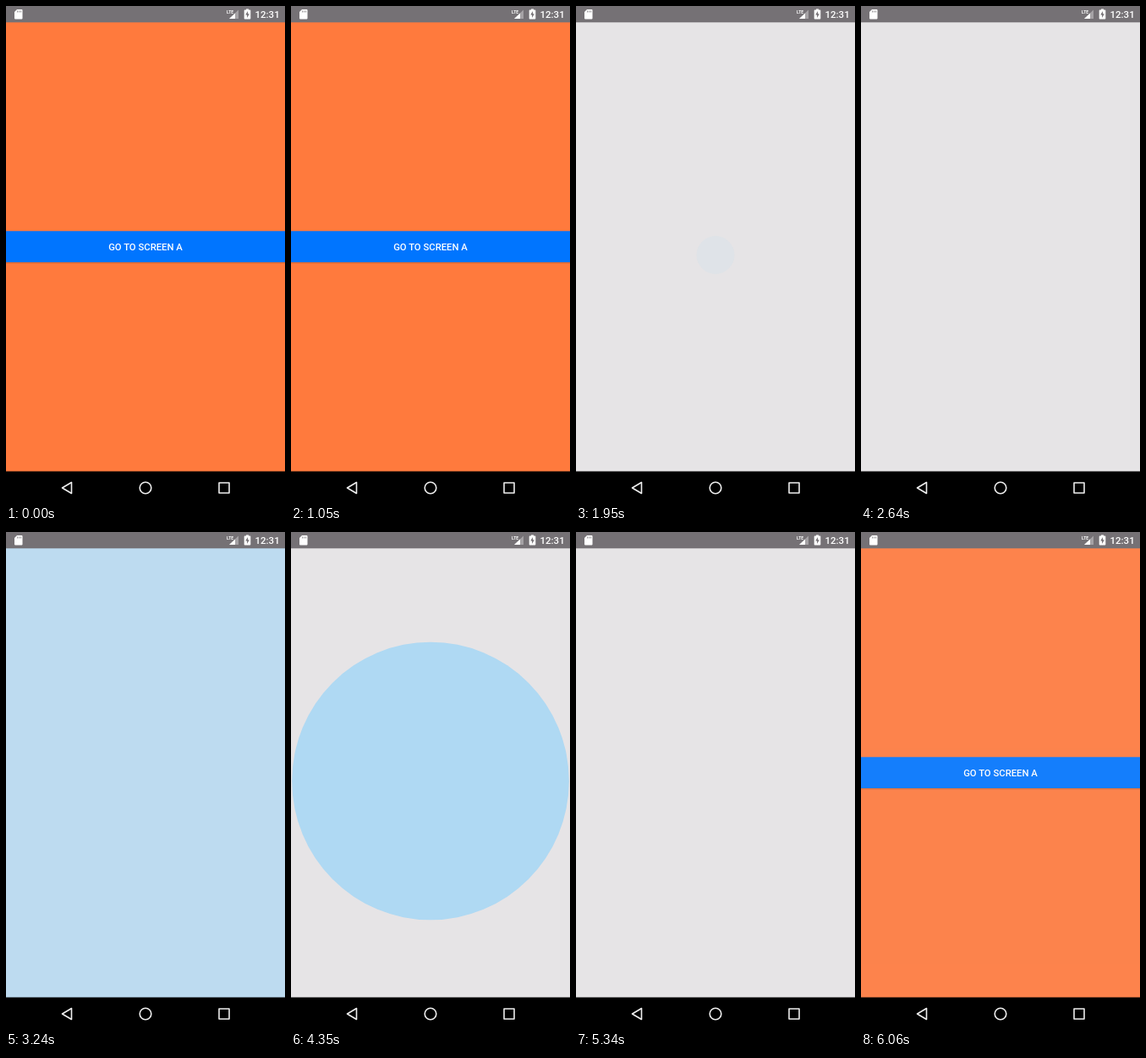
These frames come from a looping animation (330 px wide and 587 px high, 6.15 s). An HTML page:

```html
<!DOCTYPE html>
<html>
<head>
<meta charset="utf-8">
<style>
  html, body { margin: 0; width: 100%; height: 100%; overflow: hidden; background: #e6e4e6; }
  svg { display: block; width: 100vw; height: 100vh; }
  text { font-family: Roboto, sans-serif; fill: #fff; }
</style>
</head>
<body>
<svg viewBox="0 0 330 587">
  <rect width="330" height="587" fill="#e6e4e6"/>
  <rect id="screenA" width="330" height="587" fill="#74ccff"/>
  <g id="home">
    <rect width="330" height="587" fill="#ff7a3d"/>
    <rect y="301" width="330" height="2.500" fill="#a0532e" opacity=".4"/>
    <rect y="265.300" width="330" height="36.700" fill="#0075ff"/>
    <text x="165" y="288" font-size="11.300" font-weight="500" text-anchor="middle">GO TO SCREEN A</text>
  </g>
  <circle id="disc" cx="165" cy="293.500" fill="#74ccff"/>

  <!-- status bar -->
  <rect width="330" height="19.300" fill="#757175"/>
  <g fill="#fff">
    <path d="M13 4h5.500q1 0 1 1v9.500q0 1-1 1h-7.500q-1 0-1-1v-7.500z"/>
    <path d="M13.500 5.500v2M15.500 5.500v2M17.500 5.500v2" stroke="#757175" stroke-width=".8"/>
    <path d="M275 4.500v10.500h-11z" opacity=".35"/>
    <path d="M271 8.500v6.500h-7z"/>
    <text x="261" y="9" font-size="5" font-weight="700">LTE</text>
    <path d="M284 4.500v-1h3v1h1.500q.8 0 .8.800v9.400q0 .8-.8.800h-6q-.8 0-.8-.800v-9.400q0-.8.800-.800z"/>
    <path d="M286 6l-2.800 4.500h1.900v3.500l2.700-4.700h-1.800z" fill="#757175"/>
    <text x="294.500" y="14" font-size="11.500" font-weight="500">12:31</text>
  </g>

  <!-- navigation bar -->
  <rect y="548.500" width="330" height="38.500" fill="#000"/>
  <g fill="none" stroke="#eee" stroke-width="1.600" stroke-linejoin="round">
    <path d="M77.500 561.500v13l-11-6.500z"/>
    <circle cx="165" cy="568" r="6.800"/>
    <rect x="252" y="562" width="12" height="12"/>
  </g>
</svg>
<script>
  const LOOP = 6150, COVER = 337, MOVE = 500, FADE = 100;
  const [home, screenA, disc] = ['home', 'screenA', 'disc'].map(id => document.getElementById(id));

  // Each trip: the old screen turns into a shrinking disc, then a growing disc brings the new one
  const trips = [
    { shrink: 1530, grow: 2640, from: home, to: screenA },
    { shrink: 4097, grow: 5340, from: screenA, to: home }
  ];

  const ramp = (t, start, length) => Math.min(1, Math.max(0, (t - start) / length));
  const ease = u => u < .5 ? (2 * u) ** 1.75 / 2 : 1 - (2 - 2 * u) ** 1.75 / 2;

  function draw(t) {
    const { shrink, grow, from, to } = trips[t < 3840 ? 0 : 1];
    const shown = ramp(t, shrink - FADE, FADE);
    const size = t < grow ? 1 - ease(ramp(t, shrink, MOVE)) : ease(ramp(t, grow, MOVE));
    const hidden = ramp(t, grow + MOVE, 160);
    disc.setAttribute('r', COVER * size);
    disc.setAttribute('opacity', shown * size * (1 - hidden));
    from.setAttribute('opacity', 1 - shown);
    to.setAttribute('opacity', ramp(t, grow + 630, FADE));
  }

  const start = performance.now();
  function tick() {
    draw((performance.now() - start) % LOOP);
    requestAnimationFrame(tick);
  }
  tick();
</script>
</body>
</html>
```
